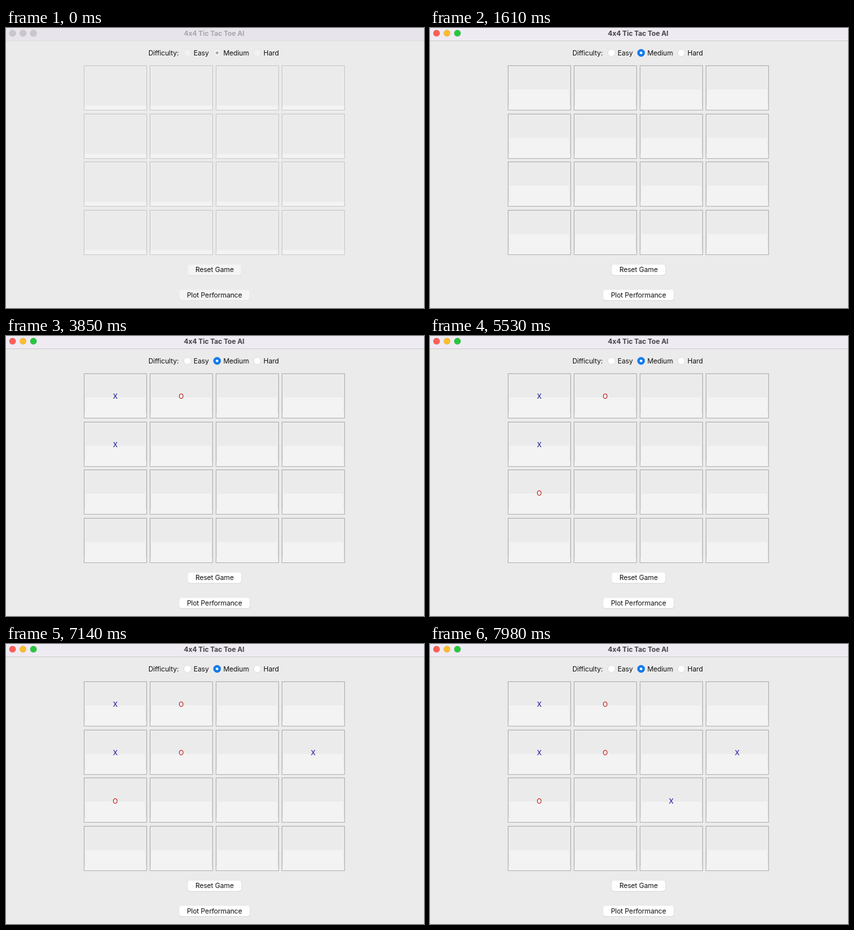
Animation of 640 by 428 pixels, one loop 8000 ms. Source, as an HTML page:

```html
<!DOCTYPE html>
<html lang="en">
<head>
<meta charset="utf-8">
<title>4x4 Tic Tac Toe AI</title>
<style>
  html, body { margin: 0; width: 100%; height: 100%; overflow: hidden; background: #ebebeb; }
  svg { display: block; width: 640px; height: 428px; }
  text { font: 10.5px Inter, "Open Sans", sans-serif; letter-spacing: -.1px; fill: #111; }
  .mid { text-anchor: middle; }

  .bar { fill: #e8e4eb; }
  .title { font-weight: 700; fill: #aaa6ad; }
  .light { fill: #cac7cc; stroke: #bdb9bf; stroke-width: .5; }
  .focused .bar { fill: #efebf3; }
  .focused .title { fill: #464349; }
  .focused .light { fill: var(--color); stroke: #0002; }

  .edge { fill: none; stroke: #cdcdcd; }
  .inner { fill: none; stroke: #f0f0f0; }
  .shade { fill: none; stroke: #e3e3e3; }
  .low { fill: #f3f3f3; }
  .half { display: none; }
  .active .edge { stroke: #b7b7b7; }
  .active .shade { stroke: #dfdfdf; }
  .active .strip { display: none; }
  .active .half { display: inline; }
  .pressed .face { fill: #dcdcdc; }
  .pressed .low { fill: #e3e3e3; }
  .face { fill: #ebebeb; }
  .X { fill: #0c0c9c; }
  .O { fill: #c01010; }

  .shadow { fill: #dedede; }
  .button { fill: #f5f5f5; }
  .radio { fill: #f1f1f1; stroke: #e2e2e2; stroke-width: .6; }
  .dot { fill: #a0a0a0; }
  .active .shadow { fill: #d0d0d0; }
  .active .button { fill: #fff; }
  .active .radio { fill: #fff; stroke: #cfcfcf; }
  .active .radio.on { fill: #0a7bf2; stroke: #0869d4; }
  .active .dot { fill: #fff; }
</style>
</head>
<body>
<svg id="stage" viewBox="0 0 640 428"></svg>
<script>
const LOOP = 8000, FOCUS = 1540, ACTIVE = 1610;
const stage = document.getElementById('stage');

// Each move: mark, row, column, time shown, optional start of the press.
const moves = [
  { mark: 'X', row: 0, col: 0, at: 2100 },
  { mark: 'O', row: 0, col: 1, at: 2310 },
  { mark: 'X', row: 1, col: 0, at: 3780, press: 3570 },
  { mark: 'O', row: 2, col: 0, at: 3990 },
  { mark: 'X', row: 1, col: 3, at: 5950, press: 5740 },
  { mark: 'O', row: 1, col: 1, at: 6160 },
  { mark: 'X', row: 2, col: 2, at: 7910, press: 7700 }
];

const label = (x, y, words, cls = '') => `<text x="${x}" y="${y}" class="${cls}">${words}</text>`;
const rect = (x, y, w, h, cls, r = 0) =>
  `<rect x="${x}" y="${y}" width="${w}" height="${h}" rx="${r}" class="${cls}"/>`;
const circle = (x, y, r, cls, style = '') =>
  `<circle cx="${x}" cy="${y}" r="${r}" class="${cls}" style="${style}"/>`;

function titleBar() {
  const lights = ['#fb5f57', '#fcbc2f', '#28c63f']
    .map((color, i) => circle(10 + 16 * i, 8, 5, 'light', `--color:${color}`));
  return rect(0, 0, 640, 19, 'bar') + rect(0, 19, 640, 1, 'shadow') + lights.join('') +
    label(318.5, 11.5, '4x4 Tic Tac Toe AI', 'title mid');
}

function radio(x, words, on) {
  return circle(x, 38, 5.5, on ? 'radio on' : 'radio') +
    (on ? circle(x, 38, 2.1, 'dot') : '') + label(x + 9.5, 41.7, words);
}

function cell(row, col) {
  const x = 119.5 + 101 * col, y = Math.round(57 + 73.67 * row) + .5;
  return `<g id="cell${row}${col}">` +
    rect(x, y, 96, 68, 'face') +
    rect(x + 1, y + 61, 94, 7, 'low strip') +
    rect(x + 1, y + 36.5, 94, 31.5, 'low half') +
    `<path d="M${x + 1} ${y + 61}V${y + 1}H${x + 95}V${y + 61}" class="shade"/>` +
    `<path d="M${x + 2} ${y + 61}V${y + 2}H${x + 94}V${y + 61}" class="inner"/>` +
    rect(x, y, 96, 68, 'edge') + '</g>';
}

function button(x, y, w, words) {
  return rect(x - .3, y + .5, w + .6, 16.2, 'shadow', 4) + rect(x, y, w, 16, 'button', 4) +
    label(x + w / 2, y + 11.5, words, 'mid');
}

const cells = Array.from({ length: 16 }, (_, i) => cell(i >> 2, i % 4)).join('');
const marks = moves.map((m, i) =>
  `<g id="mark${i}">${label(167.3 + 101 * m.col, 96.3 + 73.67 * m.row, m.mark, 'mid ' + m.mark)}</g>`).join('');

stage.innerHTML = rect(0, 0, 640, 428, 'face') + titleBar() +
  label(218, 41.7, 'Difficulty:') +
  radio(277.8, 'Easy') + radio(323.2, 'Medium', true) + radio(384.8, 'Hard') +
  cells + marks +
  button(278.3, 361.8, 82, 'Reset Game') + button(265.2, 400.2, 108, 'Plot Performance');

function draw(now) {
  const t = now % LOOP;
  stage.classList.toggle('focused', t >= FOCUS);
  stage.classList.toggle('active', t >= ACTIVE);
  moves.forEach((m, i) => {
    document.getElementById('mark' + i).style.display = t >= m.at ? '' : 'none';
    document.getElementById(`cell${m.row}${m.col}`)
      .classList.toggle('pressed', t >= m.press && t < m.at);
  });
}

const start = performance.now();
function tick() {
  draw(performance.now() - start);
  requestAnimationFrame(tick);
}
tick();
</script>
</body>
</html>
```
